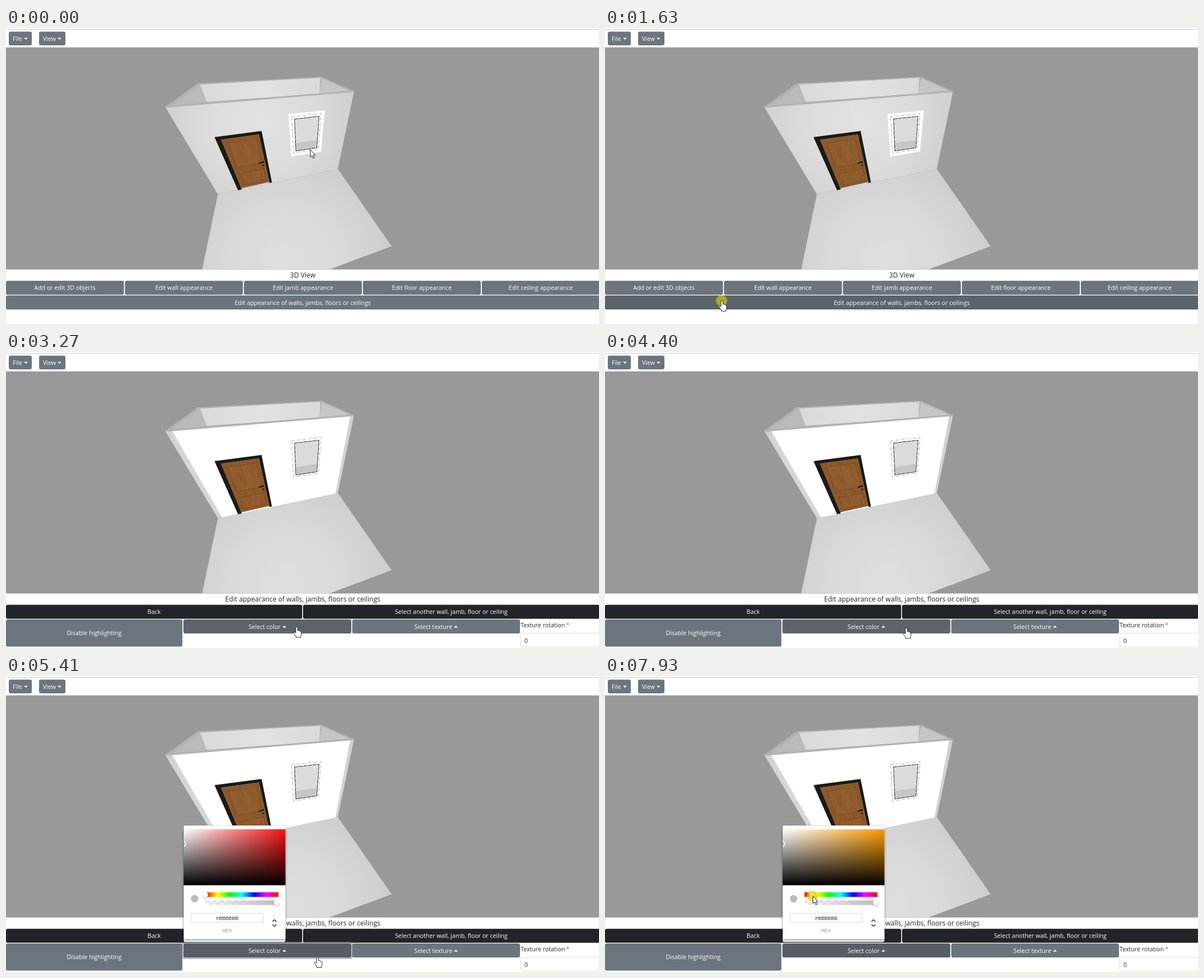
Animation of 1058x529 px, one loop 8 s. Source, as an HTML page:

```html
<!DOCTYPE html>
<html lang="en">
<head>
<meta charset="utf-8">
<title>Room editor</title>
<style>
  html, body { margin: 0; width: 100%; height: 100%; overflow: hidden; background: #fff; }
  svg { display: block; }
  text { font: 10.65px "Open Sans", "Noto Sans", sans-serif; fill: #fff; }
  .dark { fill: #212529; }
  .heading { font-size: 12.15px; fill: #212529; }
  .mid { text-anchor: middle; }
  .mono { font: 9.6px "Liberation Mono", "Courier New", monospace; text-anchor: middle; }
</style>
</head>
<body>
<svg id="stage" width="1058" height="529" viewBox="0 0 1058 529"></svg>
<script>
const LOOP = 8000;
const TICK = 125.8; // the picture is refreshed once per tick

// Moments below are counted in ticks
const PICK = 14, EDIT = 21, MENU = 43, HUE_PRESS = 60, HUE_SET = 61;
const CLICKS = [
  { down: 13, up: PICK }, { down: 20, up: EDIT }, { down: 42, up: MENU }, { down: HUE_PRESS, up: 64 }
];
const START = { x: 543, y: 217 };
const STOPS = [
  { from: 1, to: 3, x: 285, y: 434 },
  { from: 3, to: 10, x: 209, y: 484 },
  { from: 10, to: 11, x: 209, y: 487 },
  { from: 13, to: 17, x: 422, y: 126 },
  { from: 17, to: 19, x: 422, y: 162 },
  { from: 22, to: 26, x: 519, y: 491 },
  { from: 34, to: 40, x: 632, y: 502 },
  { from: 40, to: 42, x: 556, y: 502 },
  { from: 44, to: 45, x: 551, y: 502 },
  { from: 46, to: 51, x: 400, y: 306 },
  { from: 51, to: 53, x: 363, y: 391 },
  { from: 53, to: 59, x: 371, y: 393 }
];

const lerp = (a, b, k) => a + (b - a) * k;
const mix = (p, q, k) => p.map((a, i) => lerp(a, q[i], k));
const poly = (points, fill, extra = '') => `<polygon points="${points}" fill="${fill}" ${extra}/>`;
const rect = (x, y, w, h, fill, extra = '') =>
  `<rect x="${x}" y="${y}" width="${w}" height="${h}" fill="${fill}" ${extra}/>`;
const text = (x, y, label, cls = '') => `<text x="${x}" y="${y}" class="${cls}">${label}</text>`;
const caret = (x, y, dir) => `<path d="M${x} ${y}h6.8l-3.4 ${3.5 * dir}z" fill="#fff"/>`;
const stops = colors => colors.map((c, i) =>
  `<stop offset="${i / (colors.length - 1)}" stop-color="${c}"/>`).join('');

// A flat surface in the scene; at(u, v) goes from its top left to its bottom right corner
function surface(tl, tr, br, bl) {
  const at = (u, v) => mix(mix(tl, tr, u), mix(bl, br, u), v);
  const part = (u0, v0, u1, v1) => [at(u0, v0), at(u1, v0), at(u1, v1), at(u0, v1)].join(' ');
  return { at, part, all: part(0, 0, 1, 1) };
}

const backLeft = [342, 99], backRight = [563, 87];
const wall = surface([284, 141], [621, 113], [592, 252], [378, 297]);
const door = surface([372, 195], [456, 184], [474.5, 276], [414, 290]);
const pane = surface([504, 154], [569, 147], [562, 221], [509, 229.5]);

function random(seed) {
  const s = Math.sin(seed * 12.9898) * 43758.5453;
  return s - Math.floor(s);
}

function grain(i) {
  const u = lerp(.15, .9, random(i)), v = lerp(.08, .8, random(i + .5));
  return `<polyline points="${door.at(u, v)} ${door.at(u, v + .17)}" stroke="${i % 3 ? '#6f431c' : '#aa7442'}"
    stroke-width="1.4" opacity=".3"/>`;
}

function doorDrawing() {
  const [left, right, top, bottom] = [.11, .93, .06, .98];
  const panel = (v0, v1) => poly(door.part(.22, v0, .85, v1), '#915d2e', 'stroke="#754821" stroke-width=".8"');
  const frame = [door.at(0, 0), door.at(1, 0), door.at(1, 1), door.at(right, 1),
    door.at(right, top), door.at(left, top), door.at(left, 1), door.at(0, 1)];
  return poly(door.part(left, top, right, bottom), '#8b592b') + panel(.14, .6) + panel(.72, .93) +
    Array.from({ length: 24 }, (_, i) => grain(i)).join('') + poly(frame.join(' '), '#1c1a15') +
    '<path d="M451 241.5l8.5-2M457.5 245.5h3M459 238v3" stroke="#17130f" stroke-width="2.2"/>';
}

const windowDrawing = () => poly(pane.all, '#fff') +
  poly(pane.part(.16, .13, .85, .89), '#dbdbdb') +
  poly(pane.part(.16, .7, .85, .89), '#c6c6c6') +
  poly(pane.part(.08, .07, .9, .93), 'none', 'stroke="#222" stroke-width=".7" stroke-dasharray="5 2 1 2" opacity=".6"') +
  poly(pane.part(.16, .13, .85, .89), 'none', 'stroke="#222" stroke-dasharray="7 1"');

const room = () =>
  rect(0, 34.6, 1058, 397, '#999') +
  poly([wall.at(0, 0), backLeft, backRight, wall.at(1, 0)].join(' '), '#b2b2b2') +
  poly('345,102 296,138 358,132', '#bababa') +
  poly('346,101 561,89 559,117 358,132', 'url(#backWall)') +
  poly('564,90 613,112 559,117', '#c6c6c6') +
  poly(wall.all, 'url(#wall)') +
  poly([wall.at(0, 1), wall.at(1, 1), '688,390 577,431.6 350,431.6'].join(' '), 'url(#floor)') +
  `<g id="highlight">${poly(wall.part(.035, 0, .98, 1), '#fff')}</g>` +
  `<polyline points="${wall.at(0, 0)} ${wall.at(1, 0)}" stroke="#b2b2b2" stroke-width="3"/>` +
  doorDrawing() + windowDrawing();

const COLORS = { gray: ['#6c757d', '#5c636a'], dark: ['#212529', '#1c1f23'] };
const ROW1 = 451.7, ROW2 = 478;
const buttons = [];

function button(page, x, y, w, label, { h = 25, kind = 'gray', menu = false } = {}) {
  const index = buttons.push({ page, x, y, w, h, kind, label }) - 1;
  const center = Math.min(x + w / 2, 954) - (menu ? 5 : 0);
  return rect(x, y, w, h, COLORS[kind][0], `rx="3" id="button${index}"`) +
    text(center, y + h / 2 + 4.2, label, 'mid') +
    (menu ? caret(x + w / 2 + (label.length > 12 ? 32 : 27), y + 14.5, -1) : '');
}

const heading = label => text(529.5, 446, label, 'heading mid');
const ALL_PARTS = 'Edit appearance of walls, jambs, floors or ceilings';

const mainPage = () => heading('3D View') +
  ['Add or edit 3D objects', 'Edit wall appearance', 'Edit jamb appearance', 'Edit floor appearance',
    'Edit ceiling appearance'].map((name, i) => button('main', i * 212.25, ROW1, 210.4, name)).join('') +
  button('main', 0, ROW2, 1059, ALL_PARTS);

const pickPage = () => heading(ALL_PARTS) + button('pick', 0, ROW1, 1058, 'Back', { kind: 'dark' });

const editPage = () => heading(ALL_PARTS) +
  button('edit', 0, ROW1, 528.5, 'Back', { kind: 'dark' }) +
  button('edit', 530, ROW1, 529, 'Select another wall, jamb, floor or ceiling', { kind: 'dark' }) +
  button('edit', 0, ROW2, 314.7, 'Disable highlighting', { h: 48.5 }) +
  rect(314.7, 476.5, 303, 28, 'none', 'id="ring" rx="4" stroke="#828a91" stroke-opacity=".55" stroke-width="3"') +
  button('edit', 316.5, ROW2, 299.5, 'Select color', { menu: true }) +
  button('edit', 617.7, ROW2, 299.3, 'Select texture', { menu: true }) +
  text(918, 492, 'Texture rotation °', 'dark') +
  rect(918.5, 502.5, 145, 24.5, '#fff', 'rx="3" stroke="#d8dce0"') +
  text(925, 519.5, '0', 'dark');

const knob = (id, x, y) =>
  `<circle id="${id}" cx="${x}" cy="${y}" r="5" fill="#f8f8f8" filter="url(#soft)"/>`;

function picker() {
  const shade = (fill, extra) => rect(317, 274, 181.5, 100, fill, extra);
  const bar = (y, fill) => rect(356, y, 130, 8.3, fill);
  return rect(317, 267, 181.5, 208.5, '#fff', 'rx="3" stroke="#000" stroke-opacity=".17"') +
    rect(317, 273.5, 181.5, 196.5, '#fff', 'rx="1.5" filter="url(#drop)"') +
    shade('#f81010', 'id="hueFill"') + shade('url(#toWhite)') + shade('url(#toBlack)') +
    '<path d="M317 295.2A5 5 0 0 1 317 304.8" fill="none" stroke="#fff" stroke-width="1.4"/>' +
    '<circle cx="336.5" cy="398" r="6.3" fill="#bbb" stroke="#aaa" stroke-width=".6"/>' +
    bar(386.5, 'url(#rainbow)') + bar(401, 'url(#checker)') + bar(401, 'url(#alpha)') +
    knob('hueKnob', 355.5, 391) + knob('alphaKnob', 483, 405.3) +
    rect(330.5, 424, 129, 16, '#fff', 'rx="1.5" stroke="#d6d6d6"') +
    '<text class="mono" x="394.5" y="436" style="fill:#333">#BBBBBB</text>' +
    '<text class="mono" x="394.5" y="458.3" style="fill:#969696">HEX</text>' +
    '<path d="M475.5 439l3.5-3.5 3.5 3.5M475.5 444l3.5 3.5 3.5-3.5" fill="none" stroke="#333" stroke-width="1.5"/>';
}

const toolButton = (x, w, label) => rect(x, 6.5, w, 24.6, '#6c757d', 'rx="3"') +
  text(x + 7, 23.3, label) + caret(x + w - 14, 17.5, 1);

const stage = document.getElementById('stage');
stage.innerHTML = `<defs>
  <radialGradient id="wall" gradientUnits="userSpaceOnUse" cx="450" cy="165" r="185">${stops(['#e2e2e2', '#dcdcdc', '#cecece'])}</radialGradient>
  <radialGradient id="floor" gradientUnits="userSpaceOnUse" cx="500" cy="415" r="185">${stops(['#dfdfdf', '#dadada', '#cecece'])}</radialGradient>
  <linearGradient id="backWall">${stops(['#d9d9d9', '#e2e2e2', '#dadada'])}</linearGradient>
  <linearGradient id="rainbow">${stops(['#f00', '#ff0', '#0f0', '#0ff', '#00f', '#f0f', '#f00'])}</linearGradient>
  <linearGradient id="toWhite">${stops(['#fff', 'rgba(255,255,255,0)'])}</linearGradient>
  <linearGradient id="toBlack" x2="0" y2="1">${stops(['rgba(0,0,0,0)', '#000'])}</linearGradient>
  <linearGradient id="alpha">${stops(['rgba(187,187,187,0)', '#bbb'])}</linearGradient>
  <pattern id="checker" x="356" y="401" width="13" height="8.3" patternUnits="userSpaceOnUse">
    <path d="M0 0h6.5v4.15h6.5v4.15h-6.5v-4.15h-6.5z" fill="#e4e4e4"/></pattern>
  <filter id="soft" x="-50%" y="-50%" width="200%" height="200%">
    <feDropShadow dx="0" dy="1" stdDeviation="1" flood-opacity=".37"/></filter>
  <filter id="drop" x="-10%" y="-10%" width="120%" height="120%">
    <feDropShadow dx="0" dy="2" stdDeviation="2" flood-opacity=".4"/></filter>
</defs>
${rect(0, 2, 1058, 1, '#c9c9cc')}
${toolButton(5, 41, 'File')}${toolButton(59, 47, 'View')}
${room()}
<g id="main">${mainPage()}</g>
<g id="pick">${pickPage()}</g>
<g id="edit">${editPage()}</g>
<g id="picker">${picker()}</g>
<circle id="press" r="10" fill="#dcd400" fill-opacity=".62"/>
<g id="pointer" stroke="#111" stroke-width=".9" fill="#fff" stroke-linejoin="round">
  <path id="arrow" d="M0 .4V13.6L3 10.9 5 15.9 7.2 15 5.2 10.2H9Z"/>
  <path id="hand" d="M-2 1.8Q-2 .3-.3.3 1.4.3 1.4 1.8V6.6Q4 5.6 4.3 7.4 6 6.6 6.4 8.4 8 8 8 10V13Q8 15 6.8 16.5V19H-1.5V17L-5.5 11.8Q-6.7 9.8-4.9 9.4-3.5 9.2-2 11.2Z"/>
</g>`;

const el = id => document.getElementById(id);
const show = (id, on) => el(id).setAttribute('display', on ? 'inline' : 'none');
const inside = (x, y, b) => x >= b.x && x <= b.x + b.w && y >= b.y && y <= b.y + b.h;

function pointerAt(tick) {
  let { x, y } = START;
  for (const stop of STOPS) {
    const k = Math.min(1, Math.max(0, (tick - stop.from) / (stop.to - stop.from)));
    x = lerp(x, stop.x, k);
    y = lerp(y, stop.y, k);
  }
  return { x, y };
}

function draw(time) {
  const tick = Math.floor((time + 8) / TICK);
  const page = tick < PICK ? 'main' : tick < EDIT ? 'pick' : 'edit';
  const menu = tick >= MENU;
  const { x, y } = pointerAt(tick);
  const overMenu = menu && inside(x, y, { x: 317, y: 267, w: 181, h: 208 });

  for (const name of ['main', 'pick', 'edit']) show(name, name === page);
  show('highlight', page === 'edit');
  show('picker', menu);
  show('ring', menu && tick < HUE_PRESS);

  let hovering = false;
  buttons.forEach((b, i) => {
    const over = b.page === page && !overMenu && inside(x, y, b);
    hovering = hovering || over;
    const fill = menu && b.label === 'Select color' ? '#565e64' : COLORS[b.kind][over ? 1 : 0];
    el('button' + i).setAttribute('fill', fill);
  });

  const picked = tick >= HUE_SET;
  el('hueFill').setAttribute('fill', picked ? '#fb9b00' : '#f81010');
  el('hueKnob').setAttribute('cx', picked ? 369.5 : 355.5);

  show('press', CLICKS.some(c => tick >= c.down && tick < c.up));
  el('press').setAttribute('cx', x - 1);
  el('press').setAttribute('cy', y + .5);
  el('pointer').setAttribute('transform', `translate(${x} ${y})`);
  show('arrow', !hovering);
  show('hand', hovering);
}

function frame() {
  draw(performance.now() % LOOP);
  requestAnimationFrame(frame);
}
frame();
</script>
</body>
</html>
```
